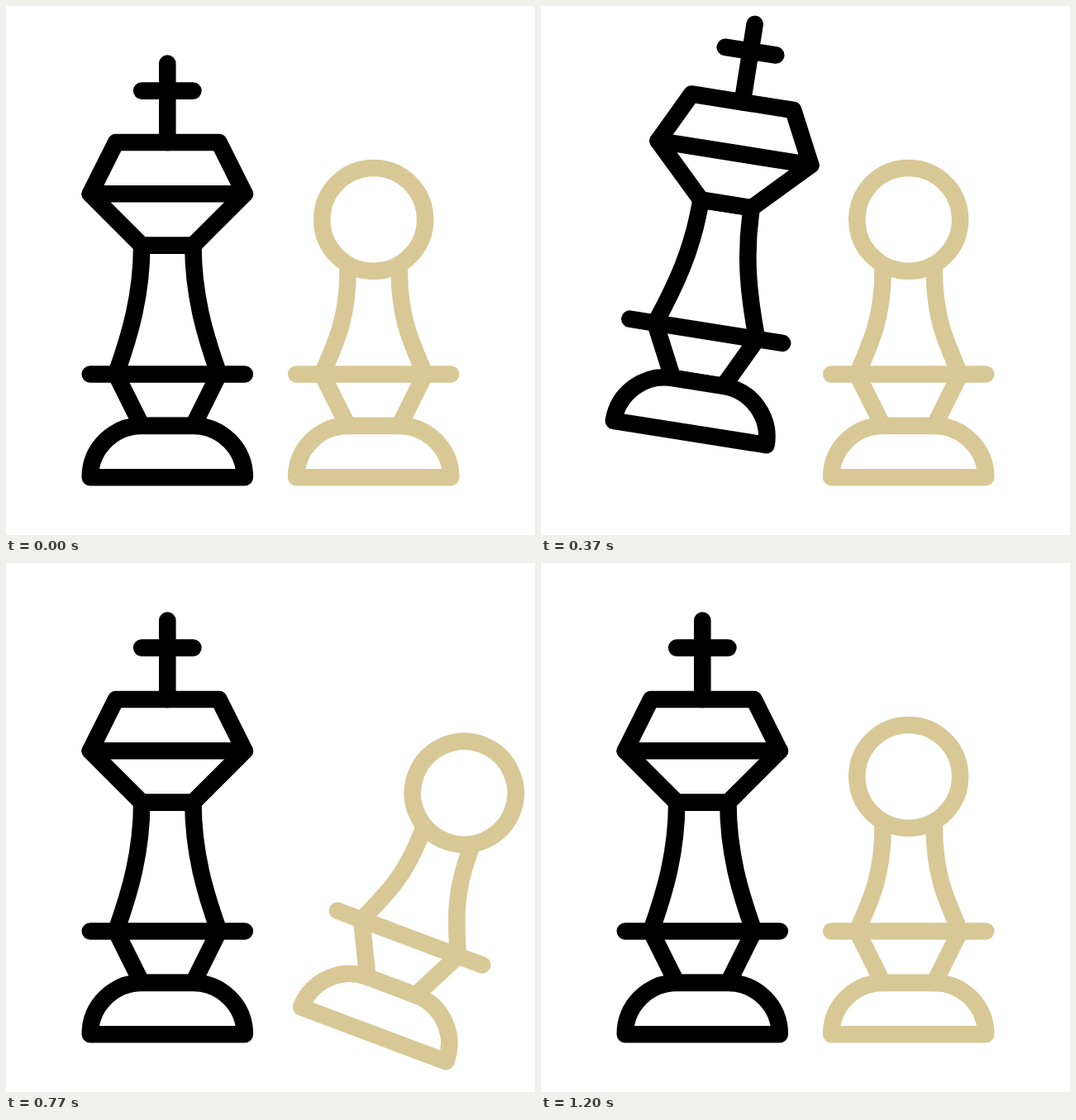
Recreate the animation shown at these times as an HTML page. Size 640x640 px, loop 1670 ms.

```html
<!DOCTYPE html>
<html lang="en">
<head>
<meta charset="utf-8">
<title>Chess move</title>
<style>
  html, body { margin: 0; width: 100%; height: 100%; overflow: hidden; background: #fff; }
  svg { display: block; width: 100vw; height: 100vh; }
  g { fill: none; stroke-width: 20.6; stroke-linecap: round; stroke-linejoin: round; }
  #pawn { stroke: #d8c896; }
  #king { stroke: #000; }
  .solid { fill: #fff; }
</style>
</head>
<body>
<svg viewBox="0 0 640 640">
  <g id="pawn">
    <path d="M413.6 313V320C413.6 376 400 406 382.4 445.5L413.6 508"/>
    <path d="M475.8 313V320C475.8 376 489.4 406 507 445.5L475.8 508"/>
    <circle cx="444.7" cy="258.4" r="62.4"/>
    <path d="M351.2 445.5H538.2"/>
    <path d="M351.2 570.2A62.3 62.3 0 0 1 413.5 507.9H475.9A62.3 62.3 0 0 1 538.2 570.2Z"/>
  </g>
  <g id="king">
    <path class="solid" d="M164.2 289.6C164.2 350 150 398 133 445.5L164.2 508H226.4L257.6 445.5C240.6 398 226.4 350 226.4 289.6Z"/>
    <path class="solid" d="M133 165H257.6L288.8 227.3L226.4 289.6H164.2L101.8 227.3Z"/>
    <path d="M101.8 227.3H288.8M195.3 69.5V165M164.2 102.6H226.4M101.8 445.5H288.8"/>
    <path class="solid" d="M101.8 570.2A62.3 62.3 0 0 1 164.1 507.9H226.5A62.3 62.3 0 0 1 288.8 570.2Z"/>
  </g>
</svg>
<script>
  const LOOP = 1670, STEP = 1000 / 30, LAST = 36;
  const king = document.getElementById('king');
  const pawn = document.getElementById('pawn');

  // Closed form of cubic-bezier(.5, 0, .5, 1)
  function ease(x) {
    const s = 0.5 + Math.sinh(Math.asinh(4 * (x - 0.5)) / 3);
    return s * s * (3 - 2 * s);
  }

  // Keys are [step, value] pairs; the value holds outside their range
  function track(keys, n) {
    const i = keys.findIndex(([at]) => at > n);
    if (i < 0) return keys[keys.length - 1][1];
    if (i === 0) return keys[0][1];
    const [a, from] = keys[i - 1], [b, to] = keys[i];
    return from + (to - from) * ease((n - a) / (b - a));
  }

  const kingTurn = [[0, 0], [7, 20.6], [18, -26], [19, -26], [23, 0]];
  const kingX = [[0, 0], [7, 28.5], [16, 51.4], [19, 51.4], [23, 0]];
  const kingY = [[0, 0], [7, -49.6], [19, -49.6], [23, 0]];
  const pawnTurn = [[13, 0], [25, 21.5], [36, 0]];

  function draw(now) {
    const t = now % LOOP;
    // The motion runs at 30 steps per second, then rests
    const n = Math.min(LAST, Math.floor((t + 4) / STEP));
    king.setAttribute('transform',
      `translate(${track(kingX, n)} ${track(kingY, n)}) rotate(${track(kingTurn, n)} 195.3 235)`);
    pawn.setAttribute('transform', `rotate(${track(pawnTurn, n)} 444.7 570.2)`);
  }

  const start = performance.now();
  function tick() {
    draw(performance.now() - start);
    requestAnimationFrame(tick);
  }
  tick();
</script>
</body>
</html>
```
